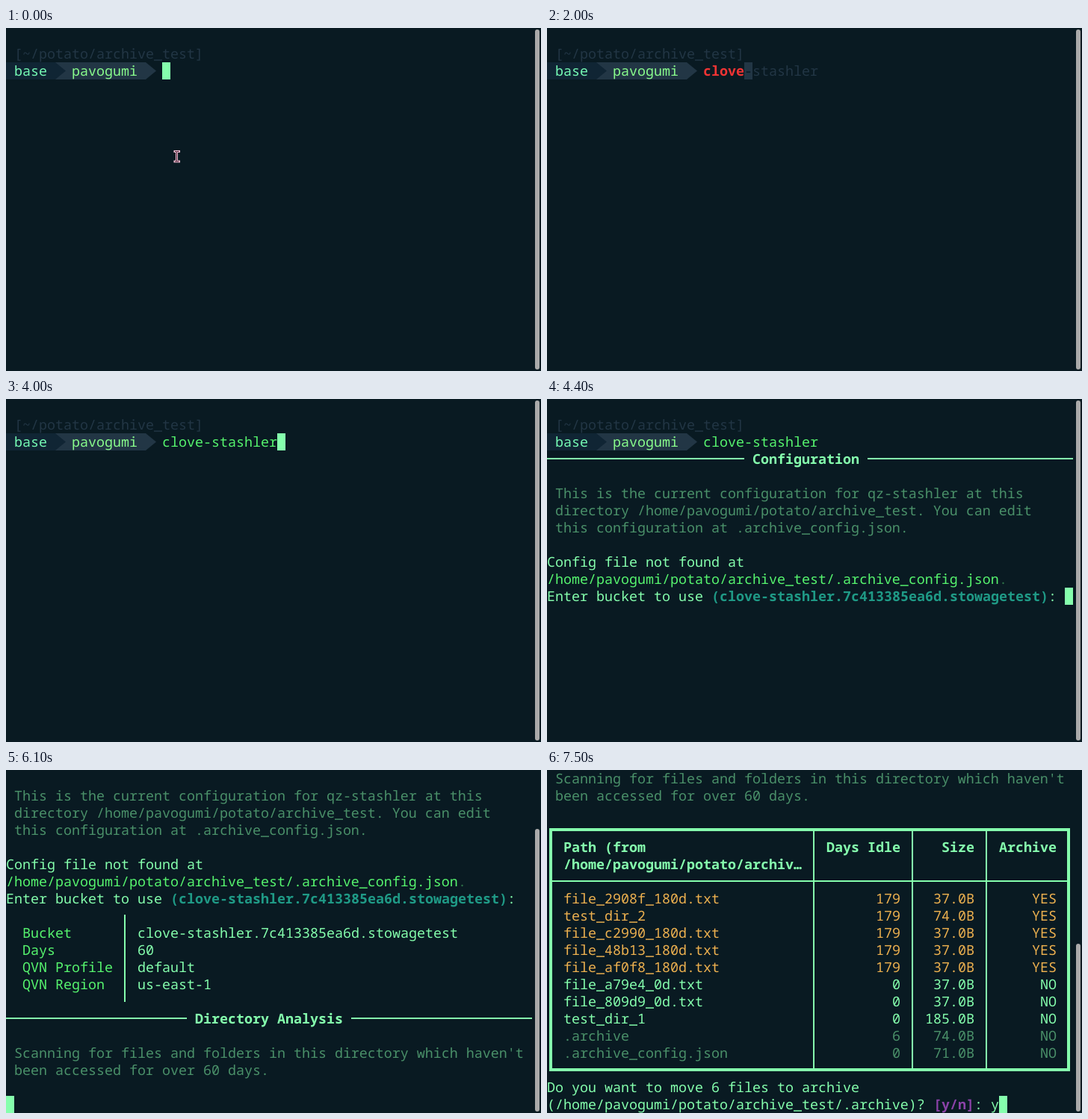
Write an HTML page that moves like this. It is 716 by 460 pixels and loops after 8000 ms.

```html
<!DOCTYPE html>
<html lang="en">
<head>
<meta charset="utf-8">
<title>Terminal session</title>
<style>
  html, body { margin: 0; width: 100%; height: 100%; overflow: hidden; background: #091a22; }
  svg { display: block; width: 716px; height: 460px; }
  text {
    font: 18.3333px "Roboto Mono", "Noto Sans Mono", "DejaVu Sans Mono", monospace;
    white-space: pre;
    text-rendering: geometricPrecision;
    font-variant-ligatures: none;
  }
  .bold { font-weight: 700; }
</style>
</head>
<body>
<svg id="stage" viewBox="0 0 716 460" xmlns="http://www.w3.org/2000/svg"></svg>
<script>
const LOOP = 8000, CW = 11, RH = 23, COLS = 64;
const C = {
  bg: '#091a22', fg: '#85ffad', green: '#56f46e', dim: '#4a9069', dot: '#2f7449',
  ghost: '#223645', base: '#75f9b4', user: '#88fb8c', tab: '#102534',
  red: '#ef3434', teal: '#1f9a86', orange: '#ecb04f', purple: '#8b42a8', bar: '#aaaaaa'
};
const USER = 'pavogumi', COMMAND = 'clove-stashler';
const BUCKET = COMMAND + '.7c413385ea6d.stowagetest';
const HOME = `/home/${USER}/potato/archive_test`;

const stage = document.getElementById('stage');

function el(parent, tag, attrs) {
  const node = document.createElementNS('http://www.w3.org/2000/svg', tag);
  for (const key in attrs) node.setAttribute(key, attrs[key]);
  return parent.appendChild(node);
}
const group = parent => el(parent, 'g', {});
const rect = (parent, x, y, width, height, fill) => el(parent, 'rect', { x, y, width, height, fill });

function write(parent, row, col, str, fill, bold) {
  const node = el(parent, 'text', { x: col * CW, y: row * RH + 18, fill });
  if (bold) node.setAttribute('class', 'bold');
  node.textContent = str;
  return node;
}
const writeRight = (parent, row, end, str, fill, bold) =>
  write(parent, row, end - str.length, str, fill, bold);

// Centred heading between two lines
function rule(parent, row, title) {
  const start = Math.floor((COLS - title.length) / 2), end = start + title.length + 1;
  const y = row * RH + 10;
  rect(parent, 0, y, (start - 1) * CW, 2, C.fg);
  rect(parent, end * CW, y, (COLS - end) * CW, 2, C.fg);
  write(parent, row, start, title, C.fg, true);
}

rect(stage, 0, 0, 716, 460, C.bg);
const screen = group(stage);

// Prompt
write(screen, 1, 1, '[~/potato/archive_test]', C.ghost);
el(screen, 'path', { d: 'M66 46H187L201 57.5L187 69H66Z', fill: C.ghost });
el(screen, 'path', { d: 'M0 46H66L80 57.5L66 69H0Z', fill: C.tab });
write(screen, 2, 1, 'base', C.base);
write(screen, 2, 8, USER, C.user);
const typed = write(screen, 2, 19, '', C.red, true);
const hint = write(screen, 2, 19, '', C.ghost);

// Configuration
const config = group(screen);
rule(config, 3, 'Configuration');
[
  'This is the current configuration for qz-stashler at this',
  `directory ${HOME}. You can edit`,
  'this configuration at .archive_config.json.'
].forEach((line, i) => write(config, 5 + i, 1, line, C.dim));
const configPath = HOME + '/.archive_config.json';
write(config, 9, 0, 'Config file not found at', C.fg);
write(config, 10, 0, configPath, C.green);
write(config, 10, configPath.length, '.', C.dot);
write(config, 11, 0, 'Enter bucket to use', C.fg);
write(config, 11, 20, `(${BUCKET})`, C.teal, true);
write(config, 11, 61, ':', C.fg);

// Settings and analysis
const analysis = group(screen);
rect(analysis, 158, 286, 2, 117, C.fg);
[
  ['Bucket', BUCKET],
  ['Days', '60'],
  ['QVN Profile', 'default'],
  ['QVN Region', 'us-east-1']
].forEach(([label, value], i) => {
  write(analysis, 13 + i, 2, label, C.green);
  write(analysis, 13 + i, 16, value, C.fg);
});
rule(analysis, 18, 'Directory Analysis');
write(analysis, 20, 1, "Scanning for files and folders in this directory which haven't", C.dim);
write(analysis, 21, 1, 'been accessed for over 60 days.', C.dim);

// File table and question
const table = group(screen);
el(table, 'rect', { x: 5, y: 540, width: 693, height: 322, fill: 'none', stroke: C.fg, 'stroke-width': 4 });
[356, 488, 587].forEach(x => rect(table, x, 540, 2, 322, C.fg));
rect(table, 5, 608, 693, 2, C.fg);
const ENDS = [43, 52, 62];
write(table, 24, 2, 'Path (from', C.fg, true);
write(table, 25, 2, HOME.slice(0, 28) + '…', C.fg, true);
['Days Idle', 'Size', 'Archive'].forEach((s, i) => writeRight(table, 24, ENDS[i], s, C.fg, true));
[
  ['file_2908f_180d.txt', 179, 37, C.orange],
  ['test_dir_2', 179, 74, C.orange],
  ['file_c2990_180d.txt', 179, 37, C.orange],
  ['file_48b13_180d.txt', 179, 37, C.orange],
  ['file_af0f8_180d.txt', 179, 37, C.orange],
  ['file_a79e4_0d.txt', 0, 37, C.fg],
  ['file_809d9_0d.txt', 0, 37, C.fg],
  ['test_dir_1', 0, 185, C.fg],
  ['.archive', 6, 74, C.dim],
  ['.archive_config.json', 0, 71, C.dim]
].forEach(([name, days, size, color], i) => {
  const row = 27 + i;
  write(table, row, 2, name, color);
  [String(days), size.toFixed(1) + 'B', days > 60 ? 'YES' : 'NO']
    .forEach((s, k) => writeRight(table, row, ENDS[k], s, color));
});
write(table, 38, 0, 'Do you want to move 6 files to archive', C.fg);
write(table, 39, 0, `(${HOME}/.archive)?`, C.fg);
write(table, 39, 47, '[y/n]', C.purple, true);
write(table, 39, 52, ':', C.fg);
const answer = write(table, 39, 54, 'y', C.fg);

// Cursor, scrollbar and pointer
const cursor = rect(screen, 0, 0, CW, RH, C.fg);
const under = write(screen, 2, 0, '', C.bg);
const bar = el(stage, 'rect', { x: 708, width: 6, rx: 3, fill: C.bar });
const pointer = group(stage);
const beam = 'M226 165.5H228L228.5 166L229 165.5H231.5M228.5 166V178.5M226 179H231.5';
el(pointer, 'path', { d: beam, fill: 'none', stroke: '#f6c3d8', 'stroke-width': 3, 'stroke-linecap': 'square' });
el(pointer, 'path', { d: beam, fill: 'none', stroke: '#3a1024', 'stroke-width': 1 });

// [time, characters typed]
const KEYS = [[0, 0], [900, 1], [1300, 2], [1400, 4], [2000, 5], [2300, 6],
  [2400, 8], [2600, 9], [2900, 11], [3100, 12], [3500, 14]];
// Spans in which the cursor is hidden
const OFF = [[300, 900], [3700, 4000], [4600, 5200], [5800, 6100], [6600, 7300]];

const show = (node, on) => node.setAttribute('display', on ? 'inline' : 'none');

function cursorCell(t, count) {
  if (t < 4400) return [2, 19 + count];
  if (t < 6100) return [11, 63];
  if (t < 6500) return [23, 0];
  return [39, t < 7500 ? 54 : 55];
}

function draw(t) {
  const count = KEYS.filter(k => t >= k[0]).pop()[1];
  const done = count === COMMAND.length;
  const guess = t < 1000 ? '' : t < 1400 ? 'clear' : COMMAND;
  const rest = guess.slice(count);

  typed.textContent = COMMAND.slice(0, count);
  typed.setAttribute('class', done ? '' : 'bold');
  typed.setAttribute('fill', done ? C.green : C.red);
  hint.textContent = rest.slice(1);
  hint.setAttribute('x', (20 + count) * CW);

  const [row, col] = cursorCell(t, count);
  cursor.setAttribute('x', col * CW);
  cursor.setAttribute('y', row * RH);
  cursor.setAttribute('fill', rest ? C.ghost : C.fg);
  show(cursor, !OFF.some(([a, b]) => t >= a && t < b));
  under.textContent = rest.slice(0, 1);
  under.setAttribute('x', col * CW);

  show(config, t >= 4400);
  show(analysis, t >= 6100);
  show(table, t >= 6500);
  show(answer, t >= 7500);
  show(pointer, t < 900);

  const scroll = t < 6100 ? 0 : t < 6500 ? 4 : 20;
  screen.setAttribute('transform', `translate(0 ${-scroll * RH})`);
  const top = t < 6100 ? 2 : t < 6500 ? 79 : 233;
  bar.setAttribute('y', top);
  bar.setAttribute('height', 458 - top);
}

const begin = performance.now();
function tick() {
  draw((performance.now() - begin) % LOOP);
  requestAnimationFrame(tick);
}
draw(0);
requestAnimationFrame(tick);
</script>
</body>
</html>
```
